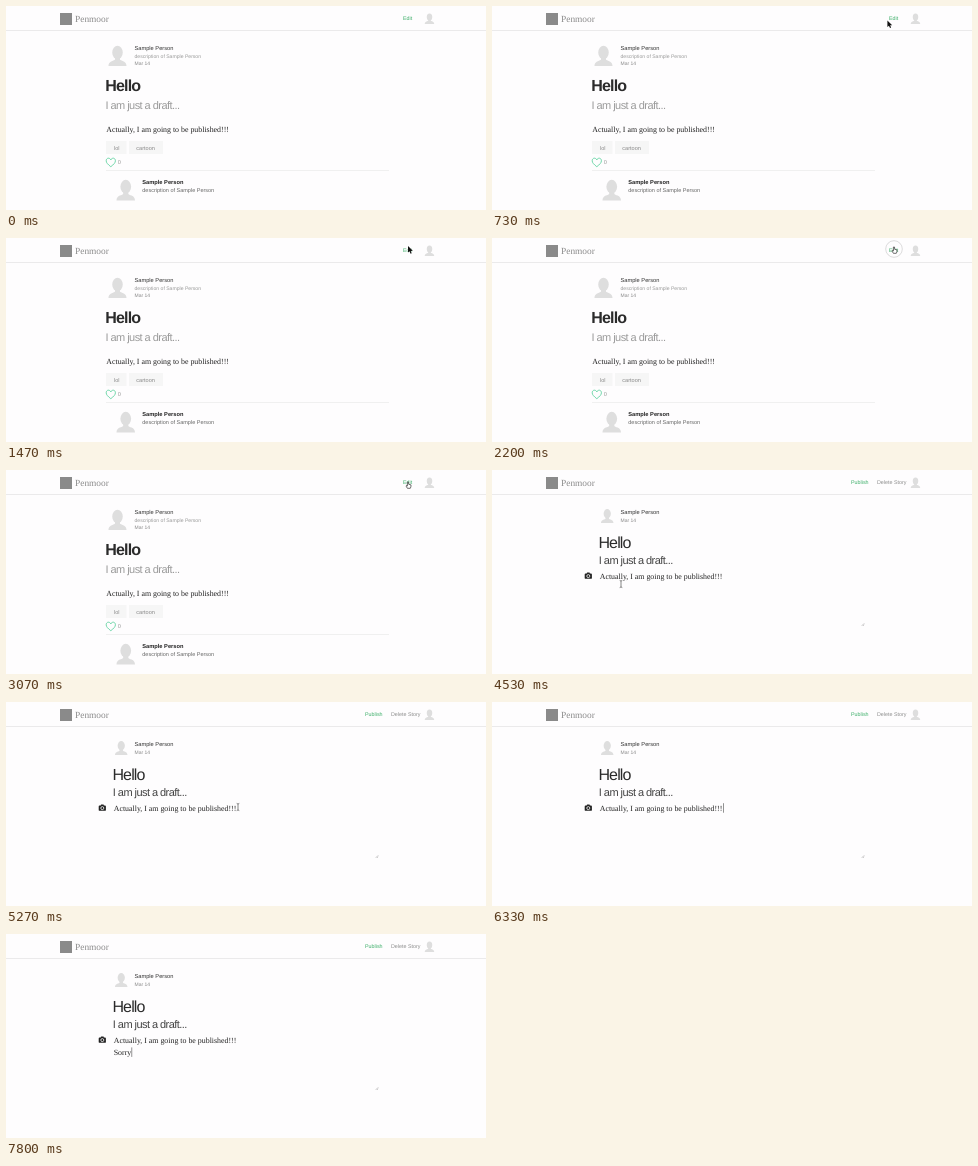
An HTML page with a canvas that plays this animation: 480x204 px, repeating every 8000 ms.

```html
<!DOCTYPE html>
<html lang="en">
<head>
<meta charset="utf-8">
<title>Editing a story</title>
<style>
  html, body { margin: 0; width: 100%; height: 100%; overflow: hidden; background: #fefdfe; }
  canvas { display: block; width: 480px; height: 204px; }
</style>
</head>
<body>
<canvas id="stage"></canvas>
<script>
const W = 480, H = 204, LOOP = 8000, STEP = 200 / 3;
const SANS = '"Liberation Sans", Arial, sans-serif';
const SERIF = '"Liberation Serif", "Times New Roman", serif';
const AUTHOR = 'Sample Person';
const STORY = 'Actually, I am going to be published!!!';
const GREEN = '#3cae68';

const canvas = document.getElementById('stage');
const ctx = canvas.getContext('2d');
const dpr = window.devicePixelRatio || 1;
canvas.width = W * dpr;
canvas.height = H * dpr;
ctx.textRendering = 'geometricPrecision';

// Pointer route: time, x, y
const route = [
  [70, 104, 177], [670, 398, 12], [870, 386, 23], [1200, 386, 23],
  [1470, 402, 8], [2870, 402, 8], [3070, 402, 11], [4070, 402, 11],
  [4530, 129, 114], [4930, 216, 105], [5270, 232, 105]
];

// Typed text: time of each key
const keys = [[6800, 'S'], [7200, 'o'], [7400, 'r'], [7530, 'r'], [7800, 'y']];

function text(str, x, y, size, color, { weight = 400, family = SANS, spacing = 0 } = {}) {
  ctx.font = `${weight} ${size}px ${family}`;
  ctx.letterSpacing = spacing + 'px';
  ctx.fillStyle = color;
  ctx.fillText(str, x, y);
}

function rect(x, y, w, h, color) {
  ctx.fillStyle = color;
  ctx.fillRect(x, y, w, h);
}

function polygon(points) {
  ctx.beginPath();
  points.forEach(([x, y]) => ctx.lineTo(x, y));
  ctx.closePath();
}

function avatar(x, y, size) {
  ctx.save();
  ctx.translate(x, y);
  ctx.scale(size, size);
  ctx.fillStyle = '#dedede';
  ctx.beginPath();
  ctx.ellipse(0.5, 0.36, 0.25, 0.32, 0, 0, Math.PI * 2);
  ctx.fill();
  ctx.beginPath();
  ctx.moveTo(0.07, 1);
  ctx.bezierCurveTo(0.08, 0.77, 0.25, 0.79, 0.38, 0.7);
  ctx.lineTo(0.38, 0.55);
  ctx.lineTo(0.62, 0.55);
  ctx.lineTo(0.62, 0.7);
  ctx.bezierCurveTo(0.75, 0.79, 0.92, 0.77, 0.93, 1);
  ctx.fill();
  ctx.restore();
}

function heart(x, y) {
  ctx.beginPath();
  ctx.moveTo(x, y + 8.4);
  ctx.bezierCurveTo(x - 3, y + 6, x - 4.6, y + 4.5, x - 4.6, y + 2.5);
  ctx.bezierCurveTo(x - 4.6, y - 0.7, x - 1, y - 0.9, x, y + 1.6);
  ctx.bezierCurveTo(x + 1, y - 0.9, x + 4.6, y - 0.7, x + 4.6, y + 2.5);
  ctx.bezierCurveTo(x + 4.6, y + 4.5, x + 3, y + 6, x, y + 8.4);
  ctx.strokeStyle = '#62d3a2';
  ctx.lineWidth = 0.9;
  ctx.stroke();
}

function camera(x, y) {
  ctx.fillStyle = '#222';
  ctx.beginPath();
  ctx.roundRect(x, y + 1.2, 7.2, 5.2, 0.9);
  ctx.roundRect(x + 2.1, y, 3, 2, 0.5);
  ctx.fill();
  ctx.beginPath();
  ctx.arc(x + 3.6, y + 3.7, 1.5, 0, Math.PI * 2);
  ctx.strokeStyle = '#fff';
  ctx.lineWidth = 0.8;
  ctx.stroke();
}

function page() {
  rect(0, 0, W, H, '#fefdfe');
  rect(0, 24, W, 1, '#ebeaeb');
  rect(54, 7, 12, 12, '#8a8a8a');
  text('Penmoor', 69, 15.7, 9.4, '#8c8c8c', { family: SERIF });
  avatar(418, 7, 11);
}

function story() {
  text('Edit', 397, 14, 5.35, GREEN);
  avatar(101, 39, 21);
  text(AUTHOR, 128.5, 44, 5.7, '#333');
  text('description of ' + AUTHOR, 128.5, 51.8, 5.1, '#999');
  text('Mar 14', 128.5, 59.4, 5, '#888');
  text('Hello', 99.3, 85.2, 16, '#2b2b2b', { weight: 700, spacing: -0.85 });
  text('I am just a draft...', 99.5, 103, 11, '#9b9b9b', { spacing: -0.55 });
  text(STORY, 100.3, 125.8, 7.88, '#222', { family: SERIF });
  rect(100, 135, 20.5, 13, '#f6f6f6');
  rect(123, 135, 34, 13, '#f6f6f6');
  text('lol', 108, 143.7, 5.5, '#888');
  text('cartoon', 130.3, 143.7, 5.6, '#888');
  heart(104.8, 152.3);
  text('0', 111.8, 157.7, 5.6, '#999');
  rect(100, 164, 283, 1, '#f0f0f0');
  avatar(109, 173, 21.5);
  text(AUTHOR, 136.3, 177.7, 5.7, '#222', { weight: 700 });
  text('description of ' + AUTHOR, 136.3, 186.3, 5.5, '#666');
}

function caret(x, y) {
  rect(x, y, 0.8, 9.5, '#777');
}

function editor(t) {
  text('Publish', 359, 14, 5.35, GREEN);
  text('Delete Story', 385, 14, 5.35, t < 4130 ? '#555' : '#8d8d8d');
  avatar(108, 38.5, 14.5);
  text(AUTHOR, 128.5, 44, 5.7, '#333');
  text('Mar 14', 128.5, 51.8, 5, '#888');
  text('Hello', 106.4, 77.8, 16, '#2b2b2b', { spacing: -0.85 });
  text('I am just a draft...', 106.8, 93.8, 11, '#444', { spacing: -0.55 });
  camera(92.7, 102.4);
  text(STORY, 107.7, 108.7, 7.88, '#222', { family: SERIF });

  ctx.strokeStyle = '#999';
  ctx.lineWidth = 0.6;
  ctx.beginPath();
  ctx.moveTo(369.8, 155.8);
  ctx.lineTo(372.2, 153.4);
  ctx.moveTo(371.2, 155.8);
  ctx.lineTo(372.2, 154.8);
  ctx.stroke();

  if (t >= 6400) {
    const typed = keys.filter(([at]) => t >= at).map(([, key]) => key).join('');
    text(typed, 107.7, 121, 7.88, '#222', { family: SERIF });
    caret(107.9 + ctx.measureText(typed).width, 113.4);
  } else if ((t >= 5330 && t < 5800) || t >= 6330) {
    caret(231, 101.2);
  }
}

function pointerAt(t) {
  let i = 0;
  while (i < route.length - 2 && t > route[i + 1][0]) i++;
  const [t0, x0, y0] = route[i], [t1, x1, y1] = route[i + 1];
  const p = Math.min(1, Math.max(0, (t - t0) / (t1 - t0)));
  const e = p * p * (3 - 2 * p);
  return [x0 + (x1 - x0) * e, y0 + (y1 - y0) * e];
}

function arrow() {
  polygon([[0, 0], [0, 6.6], [1.5, 5.3], [2.6, 7.7], [3.7, 7.2], [2.7, 4.9], [4.8, 4.8]]);
  ctx.fillStyle = '#111';
  ctx.strokeStyle = '#fff';
  ctx.lineWidth = 0.7;
  ctx.stroke();
  ctx.fill();
}

function hand() {
  polygon([[-0.6, 1], [0.5, 1], [0.7, 3.3], [3, 3.9], [2.9, 5.8], [2.3, 7.3],
    [-0.6, 7.3], [-2, 5], [-1.5, 4.4], [-0.6, 5]]);
  ctx.fillStyle = '#fff';
  ctx.strokeStyle = '#333';
  ctx.lineWidth = 0.7;
  ctx.fill();
  ctx.stroke();
}

function beam() {
  ctx.strokeStyle = '#555';
  ctx.lineWidth = 0.7;
  ctx.beginPath();
  for (const s of [-1, 1]) {
    ctx.moveTo(-1.3, 3.6 * s);
    ctx.lineTo(0, 3 * s);
    ctx.lineTo(1.3, 3.6 * s);
  }
  ctx.moveTo(0, -3);
  ctx.lineTo(0, 3);
  ctx.stroke();
}

function ring(x, y, r, alpha) {
  ctx.strokeStyle = `rgba(120, 120, 120, ${alpha})`;
  ctx.lineWidth = 1;
  ctx.beginPath();
  ctx.arc(x, y, r, 0, Math.PI * 2);
  ctx.stroke();
}

function pointer(t) {
  if (t < 70 || t >= 6330) return;
  const [x, y] = pointerAt(t);
  if (t >= 2070 && t < 2400) ring(402, 11, 8.3, t < 2200 ? 0.45 : 0.25);
  if (t >= 5330 && t < 5470) ring(231.5, 105.5, 6.5, 0.3);
  ctx.save();
  ctx.translate(x, y);
  if (t >= 1800 && t < 4130) hand();
  else if (t >= 4130 && y > 66) beam();
  else arrow();
  ctx.restore();
}

function draw(now) {
  const step = Math.floor((now % LOOP + 4) / STEP) % 120;
  const t = Math.round(step * STEP / 10) * 10;
  ctx.setTransform(dpr, 0, 0, dpr, 0, 0);
  page();
  if (t < 3530) story();
  else editor(t);
  pointer(t);
}

const start = performance.now();
function tick() {
  draw(performance.now() - start);
  requestAnimationFrame(tick);
}
tick();
</script>
</body>
</html>
```
